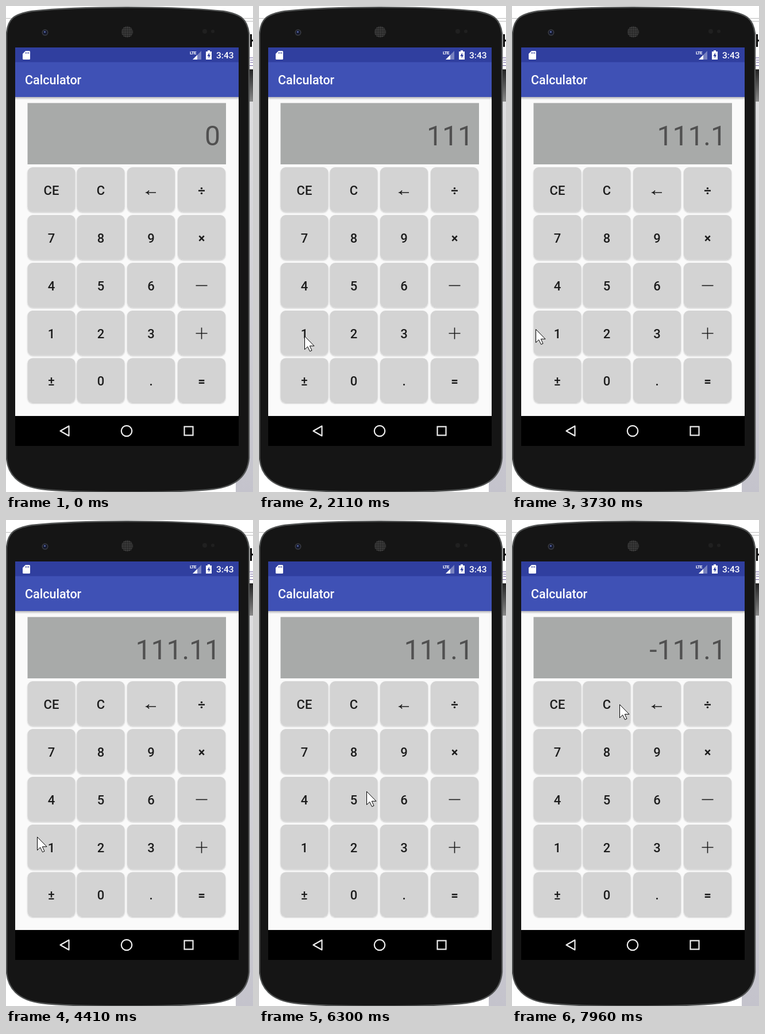
These frames come from a looping animation (430x844 px, 8000 ms). An HTML page:

```html
<!DOCTYPE html>
<html lang="en">
<head>
<meta charset="utf-8">
<title>Calculator</title>
<style>
  html, body { margin: 0; width: 100%; height: 100%; overflow: hidden; background: #fff; }
  svg { display: block; width: 430px; height: 844px; }
  text { font-family: Roboto, sans-serif; font-weight: 500; }
  .key { font-size: 22px; text-anchor: middle; fill: #1c1c1c; }
</style>
</head>
<body>
<svg viewBox="0 0 430 844" xmlns="http://www.w3.org/2000/svg">
  <defs>
    <linearGradient id="side" x1="0" y1="0" x2="0" y2="1">
      <stop offset="0" stop-color="#dedee0"/>
      <stop offset="1" stop-color="#c4c3cc"/>
    </linearGradient>
    <linearGradient id="dark" x1="0" y1="0" x2="0" y2="1">
      <stop offset="0" stop-color="#222"/>
      <stop offset="1" stop-color="#8a8a8a"/>
    </linearGradient>
    <linearGradient id="drop" x1="0" y1="0" x2="0" y2="1">
      <stop offset="0" stop-color="#b4b4b8"/>
      <stop offset="1" stop-color="#fafafa"/>
    </linearGradient>
    <pattern id="mesh" width="3" height="3" patternUnits="userSpaceOnUse">
      <rect width="3" height="3" fill="#1c1c1c"/>
      <circle cx="1.5" cy="1.5" r="1" fill="#5c5c5c"/>
    </pattern>
    <filter id="soft" x="-10%" y="-10%" width="120%" height="125%">
      <feDropShadow dx="0" dy="1.3" stdDeviation="1" flood-color="#000" flood-opacity=".22"/>
    </filter>
  </defs>

  <!-- desktop behind the phone -->
  <rect width="430" height="844" fill="#fff"/>
  <path d="M0 21.5H430M410 26.5H430" stroke="#bbb"/>
  <rect x="400" y="166" width="30" height="678" fill="url(#side)"/>
  <rect x="420" y="110" width="10" height="56" fill="url(#dark)"/>
  <path d="M426.5 49V71M426 60H430" stroke="#000" stroke-width="3"/>
  <path d="M424 90H430M425 94H430M425 98H430M424 103.5H430" stroke="#6a5a9c"/>

  <!-- phone -->
  <path d="M1 48C3 22 14 14 45 9C130 0 290 0 378 9C408 14 420 22 423 48V785C421 812 405 834 360 839C300 846 120 846 62 839C20 834 3 812 1 785Z"
        fill="#151515" stroke="#505252" stroke-width="2.4"/>
  <circle cx="68" cy="46" r="5.5" fill="#3b3d42"/>
  <circle cx="68" cy="46" r="4" fill="#15192c"/>
  <circle cx="67.5" cy="45" r="1.6" fill="#5868a8"/>
  <circle cx="211" cy="45" r="10" fill="url(#mesh)"/>
  <g fill="#202020"><circle cx="346" cy="44" r="4"/><circle cx="360" cy="44" r="3"/></g>

  <!-- screen -->
  <rect x="16" y="72" width="389" height="692" fill="#000"/>
  <rect x="16" y="158" width="389" height="554" fill="#fafafa"/>
  <rect x="16" y="158" width="389" height="5" fill="url(#drop)"/>
  <rect x="16" y="97" width="389" height="61" fill="#3f51b5"/>
  <rect x="16" y="72" width="389" height="25.500" fill="#303f9f"/>
  <text x="33" y="136" font-size="21.5" fill="#fff">Calculator</text>

  <g fill="#fff">
    <path d="M34 78H40.500Q42 78 42 79.500V91.500Q42 93 40.500 93H30.500Q29 93 29 91.500V83Z"/>
    <path d="M34.500 80V83M37 80V83M39.500 80V83" stroke="#303f9f"/>
    <path d="M340 78V93H325Z" opacity=".35"/>
    <path d="M333 85V93H325Z"/>
    <text x="320" y="84" font-size="8" style="font-weight:700" letter-spacing="-.7">LTE</text>
    <path d="M351 77H355V79H358V93H348V79H351Z"/>
    <path d="M354 81L350.300 87H352.700V91L356 85H354Z" fill="#303f9f"/>
    <text x="366" y="90.500" font-size="15.500">3:43</text>
  </g>
  <g fill="none" stroke="#eee" stroke-width="2.200">
    <path d="M109.500 729.500V746.500L94.500 738Z" stroke-linejoin="round"/>
    <circle cx="210" cy="738" r="9.200"/>
    <rect x="310.500" y="730.500" width="15" height="15"/>
  </g>

  <rect x="37.500" y="168.500" width="345.500" height="106.500" fill="#a8aaa9"/>
  <text id="display" x="373" y="241.500" text-anchor="end" fill="#505050" style="font-size:48px;font-weight:400">0</text>
  <g id="keys"></g>

  <circle id="halo" r="18" fill="#f4ec22" opacity=".62"/>
  <path id="cursor" d="M.5 .5V23.500L5.700 18.600L9.600 26.700L13 25.200L9.300 17.300H17Z" fill="#fff" stroke="#000" stroke-linejoin="round"/>
</svg>
<script>
const $ = id => document.getElementById(id);
const LOOP = 8000;

const cols = [37.5, 123.5, 211, 299];
const rows = [280, 363, 446, 529, 611.5];
const labels = ['CE', 'C', '←', '÷', '7', '8', '9', '×', '4', '5', '6', '−', '1', '2', '3', '+', '±', '0', '.', '='];
const glyphs = {
  '←': 'M-7.5 4.5H8.5M-3.5 1Q-5 3.500-8 4.500Q-5 5.500-3.500 8',
  '−': 'M-10 0H10',
  '+': 'M-10 0H10M0-10V10'
};

$('keys').innerHTML = labels.map((label, i) => {
  const x = cols[i % 4], y = rows[i >> 2];
  const cx = x + 41.5, cy = y + 39.5;
  const bold = '÷×='.includes(label) ? ' style="font-weight:700"' : '';
  const face = glyphs[label]
    ? `<path d="${glyphs[label]}" transform="translate(${cx} ${cy})" fill="none" stroke="#1c1c1c" stroke-width="1.6"/>`
    : `<text class="key" x="${cx}" y="${cy + 8}"${bold}>${label}</text>`;
  return `<rect x="${x}" y="${y}" width="83" height="77.5" rx="9" fill="#d3d3d3" filter="url(#soft)"/>${face}`;
}).join('');

// pointer waypoints: time, x, y; equal neighbours are rests
const path = [
  [-100, 400, 900], [20, 352, 840], [520, 75, 570], [2080, 75, 570],
  [2350, 215, 667], [2520, 238, 657], [2960, 238, 657],
  [3460, 41, 561], [4330, 41, 561],
  [4870, 318, 318], [4950, 291, 307], [5130, 235, 310], [5950, 235, 310],
  [6300, 187, 471], [6750, 82, 663], [6790, 82, 661], [7650, 82, 661],
  [7900, 192, 322], [7960, 187, 320], [8000, 187, 320]
];
const clicks = [[590, 700], [1090, 1200], [1740, 1850], [2600, 2770], [3500, 3620],
                [4070, 4180], [5160, 5290], [6850, 6980]];
const values = [[0, '0'], [740, '1'], [1250, '11'], [1900, '111'], [2820, '111.'],
                [3680, '111.1'], [4240, '111.11'], [5450, '111.1'], [7060, '-111.1']];

const same = (a, b) => a[1] === b[1] && a[2] === b[2];

function slope(i, k) {
  const a = path[i - 1], b = path[i], c = path[i + 1];
  if (!a || !c || same(a, b) || same(b, c)) return 0;
  return (c[k] - a[k]) / (c[0] - a[0]);
}

// cubic Hermite through the waypoints
function pointer(t) {
  let i = 0;
  while (i < path.length - 2 && t >= path[i + 1][0]) i++;
  const a = path[i], b = path[i + 1], d = b[0] - a[0], u = (t - a[0]) / d;
  const s = u * u * (3 - 2 * u);
  return [1, 2].map(k => a[k] + (b[k] - a[k]) * s
    + d * u * (1 - u) * ((1 - u) * slope(i, k) - u * slope(i + 1, k)));
}

function draw(t) {
  const [x, y] = pointer(t).map(Math.round);
  const move = `translate(${x} ${y})`;
  $('cursor').setAttribute('transform', move);
  $('halo').setAttribute('transform', move);
  $('cursor').style.display = t < 20 ? 'none' : '';
  $('halo').style.display = clicks.some(([on, off]) => t >= on && t < off) ? '' : 'none';
  $('display').textContent = values.filter(v => v[0] <= t).pop()[1];
}

const start = performance.now();
function tick() {
  draw((performance.now() - start) % LOOP);
  requestAnimationFrame(tick);
}
draw(0);
requestAnimationFrame(tick);
</script>
</body>
</html>
```
